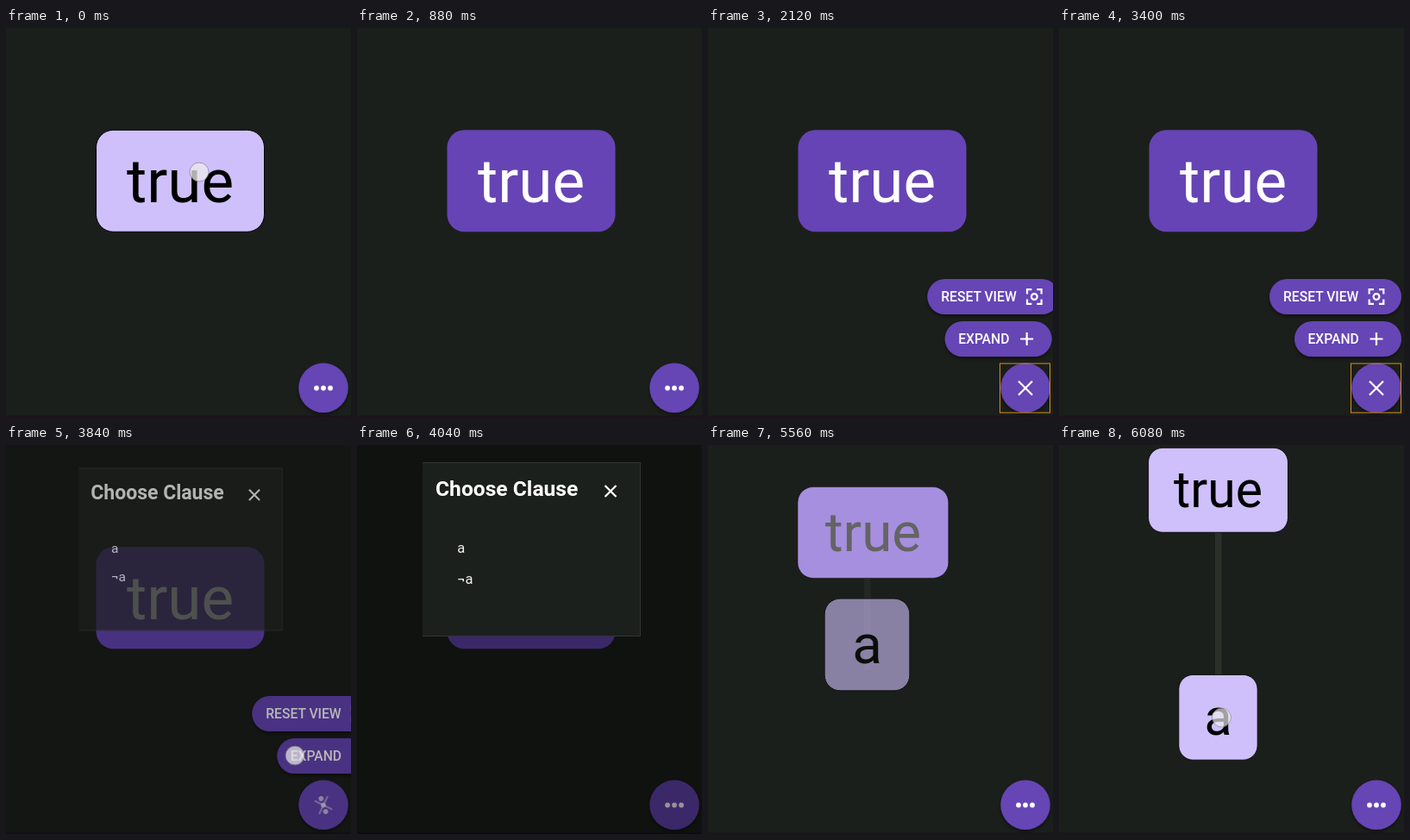
Write an HTML page that moves like this. It is 400x451 px and loops after 6720 ms.

```html
<!DOCTYPE html>
<html lang="en">
<head>
<meta charset="utf-8">
<title>Clause tree</title>
<style>
  html, body { margin: 0; width: 100%; height: 100%; overflow: hidden; background: #1b1f1b; }
  svg { display: block; width: 100vw; height: 100vh; font-family: Roboto, sans-serif; }
  .node text { font-size: 71px; text-anchor: middle; }
  .pill text { font-size: 15.7px; font-weight: 500; fill: #fff; }
  .line { fill: none; stroke: #fff; stroke-width: 2.2; }
  .item { font-size: 16.5px; fill: #f0f0f0; }
</style>
</head>
<body>
<svg viewBox="0 0 400 451">
  <defs>
    <filter id="shadow" x="-20%" y="-20%" width="140%" height="150%">
      <feDropShadow dx="0" dy="2" stdDeviation="2" flood-color="#000" flood-opacity=".5"/>
    </filter>
  </defs>
  <rect width="400" height="451" fill="#1b1f1b"/>
  <rect y="449.5" width="400" height="1.5" fill="#1d1216"/>

  <rect id="link" x="181" width="7.5" fill="#2a2f2a"/>
  <g id="root" class="node">
    <rect x="-97.5" y="-59" width="195" height="118" rx="20"/>
    <text y="24.3">true</text>
  </g>
  <g id="leaf" class="node">
    <rect x="-55" y="-59.5" width="110" height="119" rx="20"/>
    <text y="24.3">a</text>
  </g>

  <g id="reset" class="pill">
    <rect x="244" y="291" width="153" height="41" rx="20.5" fill="#6644b5" filter="url(#shadow)"/>
    <text x="260" y="317">RESET VIEW</text>
    <g class="line" transform="translate(368 311.5)">
      <path d="M-8.3-3V-8.3H-3M3-8.3H8.3V-3M8.3 3V8.3H3M-3 8.3H-8.3V3"/>
      <circle r="3.4"/>
    </g>
  </g>
  <g id="expand" class="pill">
    <rect x="273" y="340" width="124" height="41" rx="20.5" fill="#6644b5" filter="url(#shadow)"/>
    <text x="288.5" y="366">EXPAND</text>
    <path class="line" d="M360.5 360.5h15M368 353v15"/>
  </g>

  <circle cx="368" cy="417.3" r="28.7" fill="#6644b5" filter="url(#shadow)"/>
  <g id="dots" fill="#fff">
    <circle cx="-8" r="2.9"/><circle r="2.9"/><circle cx="8" r="2.9"/>
  </g>
  <path id="cross" class="line" stroke-width="2.5" d="M-8-8L8 8M8-8L-8 8"/>
  <rect id="focus" x="338.5" y="389" width="58" height="57" fill="none" stroke="#d98c22"/>

  <rect id="shade" width="400" height="451" fill="#000"/>
  <g id="dialog">
    <rect x="76" y="20" width="252.5" height="202" fill="#1c201c"/>
    <path d="M76 20.5H328.5V221.5H76" fill="none" stroke="#383c38" stroke-width=".8"/>
    <text x="91" y="59" font-size="24.6" font-weight="700" fill="#fff">Choose Clause</text>
    <path class="line" d="M287.5 47l13 13M300.5 47l-13 13"/>
    <rect id="hover" x="108" y="102" width="186.5" height="36" rx="1" fill="#1b5770"/>
    <text class="item" x="116.3" y="125">a</text>
    <text class="item" x="116.3" y="160.5">¬a</text>
  </g>
  <circle id="touch" r="11" fill="#ededed" stroke="#777" stroke-width=".8"/>
</svg>
<script>
  const LOOP = 6720, STEP = 40;
  const el = {};
  document.querySelectorAll('[id]').forEach(e => el[e.id] = e);

  const ramp = (t, a, b) => Math.min(1, Math.max(0, (t - a) / (b - a)));
  const easeOut = p => 1 - (1 - p) ** 2;
  const easeIn = p => p * p;
  const smooth = p => p * p * (3 - 2 * p);
  const mix = (a, b, p) => a + (b - a) * p;
  const tint = (a, b, p) => `rgb(${a.map((v, i) => Math.round(mix(v, b[i], p)))})`;
  const set = (e, attrs) => { for (const k in attrs) e.setAttribute(k, attrs[k]); };
  const show = (e, alpha) => set(e, { opacity: alpha, visibility: alpha > 0 ? 'visible' : 'hidden' });

  const LIGHT = [207, 192, 251], DARK = [102, 68, 181];
  // start, end, x, y, opacity
  const TOUCHES = [
    [0, 760, 224, 167, .75],
    [760, 880, 224, 167, .35],
    [1280, 2000, 368, 417, .7],
    [2600, 3400, 335, 360, .7],
    [3560, 3880, 335, 360, .7],
    [4600, 5560, 236.5, 120, .88],
    [6080, LOOP, 188.5, 316, .68]
  ];

  function paintNode(g, x, y, scale, dark) {
    set(g, { transform: `translate(${x} ${y}) scale(${scale})` });
    set(g.children[0], { fill: tint(LIGHT, DARK, dark), stroke: `rgba(0,0,0,${1 - dark})` });
    set(g.children[1], { fill: tint([0, 0, 0], [255, 255, 255], dark) });
  }

  function drawGraph(t) {
    const grow = smooth(ramp(t, 5400, 5680));
    const dark = ramp(t, 360, 600) * (1 - grow);
    const scale = mix(1, .83, grow);
    const y = mix(177.3, 52.3, grow);
    paintNode(el.root, mix(202, 184.5, grow), y, scale, dark);
    paintNode(el.leaf, 184.5, mix(y, 315.8, grow), scale, 0);
    show(el.leaf, grow);
    set(el.link, { y, height: mix(0, 263.5, grow) });
    show(el.link, grow);
  }

  function drawMenu(t) {
    const slide = (a, b) => 165 * (1 - easeOut(ramp(t, a, b)) + easeIn(ramp(t, 3720, 3960)));
    const place = (e, x) => {
      set(e, { transform: `translate(${x} 0)` });
      show(e, x < 165 ? 1 : 0);
    };
    place(el.expand, slide(1760, 2160));
    place(el.reset, slide(1880, 2200));

    const open = smooth(ramp(t, 1720, 2040)) * (1 - smooth(ramp(t, 3680, 3960)));
    set(el.dots, { transform: `translate(368 417.5) rotate(${180 * open})` });
    set(el.cross, { transform: `translate(368 417.5) rotate(${180 * open - 180})` });
    show(el.dots, 1 - open);
    show(el.cross, open);
    show(el.focus, t >= 1760 && t < 3760 ? 1 : 0);
  }

  function drawDialog(t) {
    const enter = easeOut(ramp(t, 3720, 4000));
    const leave = 1 - ramp(t, 5400, 5560);
    const scale = mix(.8, 1, enter);
    set(el.dialog, { transform: `translate(202 121) scale(${scale}) translate(-202 -121)` });
    show(el.dialog, enter * leave);
    show(el.shade, .42 * enter * leave);
    show(el.hover, t >= 5400 ? 1 : 0);
  }

  function drawTouch(t) {
    const now = TOUCHES.find(([a, b]) => t >= a && t < b);
    if (now) set(el.touch, { cx: now[2], cy: now[3] });
    show(el.touch, now ? now[4] : 0);
  }

  function frame(ms) {
    const t = Math.floor(ms % LOOP / STEP) * STEP;
    drawGraph(t);
    drawMenu(t);
    drawDialog(t);
    drawTouch(t);
  }

  const start = performance.now();
  function tick() {
    frame(performance.now() - start);
    requestAnimationFrame(tick);
  }
  tick();
</script>
</body>
</html>
```
